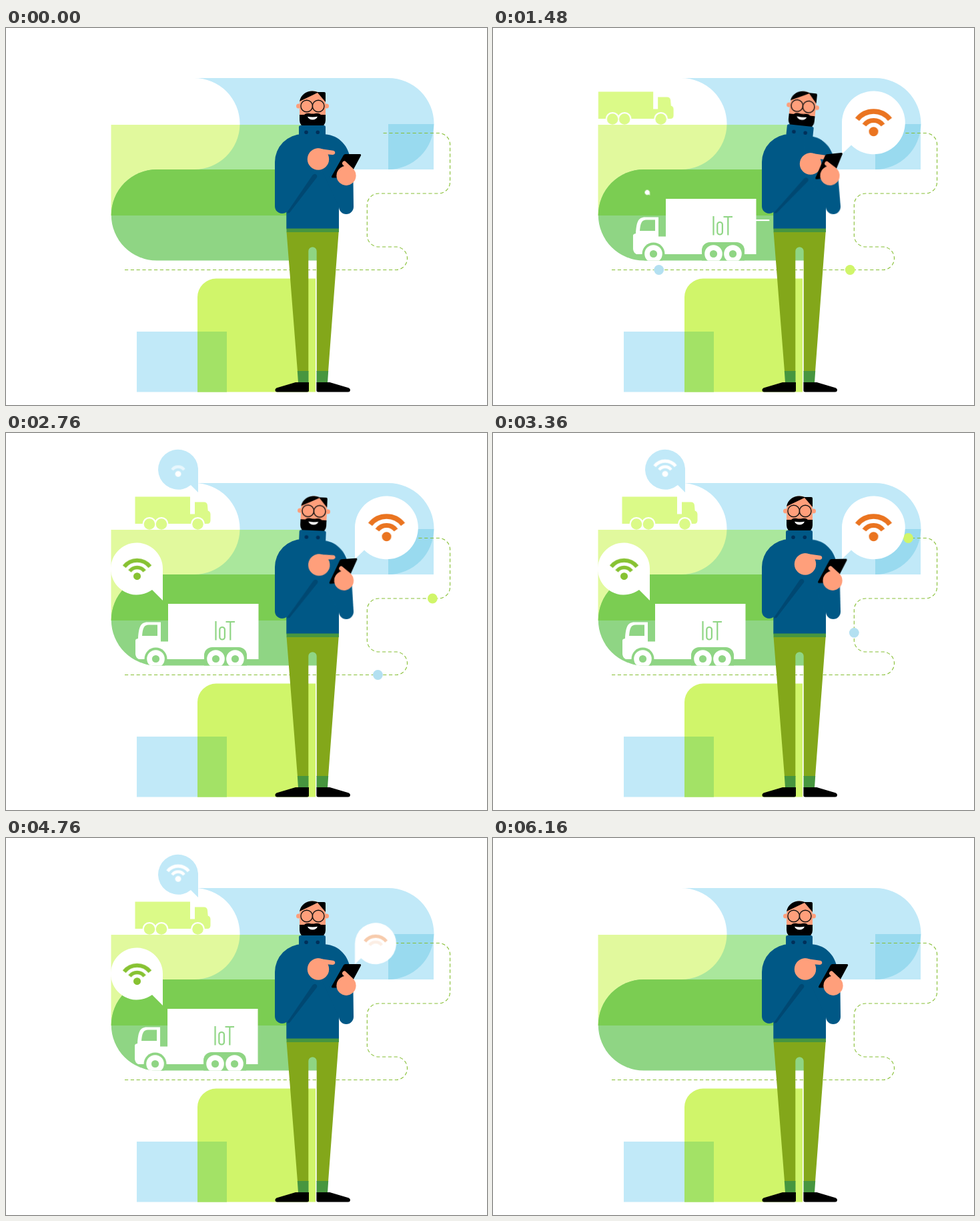
Write an HTML page that moves like this. It is 721 px wide and 565 px high and loops after 7040 ms.

```html
<!DOCTYPE html>
<html lang="en">
<head>
<meta charset="utf-8">
<title>Connected trucks</title>
<style>
  html, body { margin: 0; width: 100%; height: 100%; overflow: hidden; background: #fff; }
  svg { display: block; width: 721px; height: 565px; }

  :root {
    --loop: 7.04s;
    --route: path("M178 362.5H585.5A17.3 17.3 0 0 0 585.5 328H558.5A17.3 17.3 0 0 1 541.3 310.7V265.3A17.3 17.3 0 0 1 558.5 248H648.5A17.3 17.3 0 0 0 665.6 230.7V174.8A17.3 17.3 0 0 0 648.5 157.5H562");
  }

  /* dots on the route */
  .dot {
    offset-path: var(--route);
    offset-rotate: 0deg;
    animation: travel var(--loop) linear var(--in, 0s) infinite backwards;
  }
  @keyframes travel {
    0% { offset-distance: 0%; r: 0px; }
    1.4% { r: 7.4px; }
    51.3% { offset-distance: 100%; r: 7.4px; }
    51.31%, 100% { offset-distance: 100%; r: 0px; }
  }

  /* trucks: cubic ease-out on entry, cubic ease-in on exit */
  .big { animation: big var(--loop) linear infinite; }
  @keyframes big {
    0%, .57% { transform: translateX(534px); animation-timing-function: cubic-bezier(.333, 1, .667, 1); }
    30.24% { transform: translateX(0); }
    64.77% { transform: translateX(0); animation-timing-function: cubic-bezier(.333, 0, .667, 0); }
    83.81%, 100% { transform: translateX(-284px); }
  }
  .trail { transform-origin: 378px 288px; animation: trail var(--loop) linear infinite; }
  @keyframes trail {
    0%, 21% { transform: scaleX(1); }
    27.8%, 100% { transform: scaleX(0); }
  }
  .small { animation: small var(--loop) linear infinite; }
  @keyframes small {
    0%, .57% { transform: translateX(-328.5px); animation-timing-function: cubic-bezier(.333, 1, .667, 1); }
    39.77% { transform: translateX(0); }
    70.45% { transform: translateX(0); animation-timing-function: cubic-bezier(.333, 0, .667, 0); }
    86.65%, 100% { transform: translateX(174px); }
  }

  /* speech bubbles: one animation opens, the other closes */
  .bubble {
    animation:
      open var(--loop) linear var(--in) infinite backwards,
      close var(--loop) linear var(--out) infinite backwards;
  }
  @keyframes open {
    0% { scale: 0; animation-timing-function: cubic-bezier(.3, .4, .3, 1); }
    5.7%, 85% { scale: 1; }
    85.01%, 100% { scale: 0; }
  }
  @keyframes close {
    0% { transform: scale(1); animation-timing-function: cubic-bezier(.333, 0, .667, .333); }
    5.82%, 42.6% { transform: scale(0); }
    42.61%, 100% { transform: scale(1); }
  }
  .wifi { fill: none; stroke-width: 7; }
  .wifi > * {
    animation:
      show var(--loop) linear calc(var(--in) + .3s + var(--i) * .13s) infinite backwards,
      hide var(--loop) linear calc(var(--out) - .12s + var(--i) * .08s) infinite backwards;
  }
  .wifi > :nth-child(1) { --i: 0; }
  .wifi > :nth-child(2) { --i: 1; }
  .wifi > :nth-child(3) { --i: 2; stroke-width: 7.6; }
  @keyframes show {
    0% { opacity: 0; }
    2.7%, 85% { opacity: 1; }
    85.01%, 100% { opacity: 0; }
  }
  @keyframes hide {
    0% { stroke-opacity: 1; }
    4.55%, 42.6% { stroke-opacity: 0; }
    42.61%, 100% { stroke-opacity: 1; }
  }

  /* man */
  .head, .sleeve, .phone, .hand, .crease { animation: var(--loop) ease-in-out infinite; }
  .head { transform-origin: 459px 165px; animation-name: head; }
  @keyframes head {
    0%, .57% { transform: rotate(0deg); }
    9.1%, 30.7% { transform: rotate(6deg); }
    46%, 100% { transform: rotate(0deg); }
  }
  .sleeve { transform-origin: 510px 268px; animation-name: sleeve; }
  @keyframes sleeve {
    0%, .57% { transform: rotate(0deg); }
    9.1% { transform: rotate(-4deg); }
    30.7% { transform: rotate(-4deg); animation-timing-function: cubic-bezier(.35, 0, .35, 1); }
    59.7%, 100% { transform: rotate(0deg); }
  }
  .phone { transform-origin: 510px 221px; animation-name: phone; }
  @keyframes phone {
    0%, .57% { transform: translateX(0) rotate(0deg); }
    9.1% { transform: translateX(-5px) rotate(-6deg); }
    30.7% { transform: translateX(-5px) rotate(-6deg); animation-timing-function: cubic-bezier(.35, 0, .35, 1); }
    59.7%, 100% { transform: translateX(0) rotate(0deg); }
  }
  .hand { transform-origin: 468px 196px; animation-name: hand; }
  @keyframes hand {
    0%, 2.8% { transform: translate(0, 0) rotate(0deg); }
    9.1%, 22.2% { transform: translate(8px, 7px) rotate(0deg); }
    28%, 30.7% { transform: translate(3px, 3px) rotate(-12deg); }
    46%, 100% { transform: translate(0, 0) rotate(0deg); }
  }
  .crease { transform-origin: 422px 278px; animation-name: crease; }
  @keyframes crease {
    0%, 2.8% { transform: rotate(0deg); }
    9.1%, 22.2% { transform: rotate(7deg); }
    28%, 30.7% { transform: rotate(3deg); }
    46%, 100% { transform: rotate(0deg); }
  }
</style>
</head>
<body>
<svg viewBox="0 0 721 565">
  <defs>
    <clipPath id="lane"><path d="M226 212H466V348.5H226A68.25 68.25 0 0 1 226 212Z"/></clipPath>
    <clipPath id="top"><path d="M157.5 75H282A68.5 68.5 0 0 1 350.5 145H157.5Z"/></clipPath>
  </defs>

  <!-- backdrop -->
  <g fill="#c1e9f8">
    <path d="M282 75H573A68.5 68.5 0 0 1 573 212H282A68.5 68.5 0 0 0 282 75Z"/>
    <path d="M573 144H641V212H573Z"/>
    <path d="M196 455H331V545.5H196Z"/>
  </g>
  <path fill="#99daef" d="M573 144H641.3A68.5 68.5 0 0 1 573 212Z"/>
  <path fill="#e1f99d" d="M157.5 145H442V281H157.5Z"/>
  <path fill="#aae79c" d="M350.5 145A68.5 68.5 0 0 1 282 212H442V145Z"/>
  <path fill="#8fd584" d="M226 212H466V348.5H226A68.25 68.25 0 0 1 226 212Z"/>
  <path fill="#7bcd52" d="M226 212H442V281H157.8A68.25 68.25 0 0 1 226 212Z"/>
  <path fill="#d0f56a" d="M287 545.5V403.5A28 28 0 0 1 315 375.5H464V545.5Z"/>
  <path fill="#a3e266" d="M287 455H331V545.5H287Z"/>

  <!-- small truck -->
  <g clip-path="url(#top)">
    <g class="small" fill="#dbfa88">
      <path d="M193.5 95.5H276V121.5H283V103.5H296.5Q301.5 103.5 302 108.5L302.7 116.5Q306.5 117.5 306.5 122V131.5Q306 136 302 136H193.5Z"/>
      <g fill="#fff">
        <circle cx="215" cy="136.5" r="10.5"/>
        <circle cx="233" cy="136.5" r="10.5"/>
        <circle cx="287.5" cy="136.5" r="10.5"/>
      </g>
      <circle cx="215" cy="136.5" r="8.3"/>
      <circle cx="233" cy="136.5" r="8.3"/>
      <circle cx="287.5" cy="136.5" r="8.3"/>
    </g>
  </g>

  <!-- big truck -->
  <g clip-path="url(#lane)">
    <g class="big" fill="#fff">
      <path d="M243 256H378.5V339H199Q194 336 194 331V311Q194 308.5 198 308C199 292 201 283.5 212 283.5H232V312.5H243Z"/>
      <path class="trail" d="M378 287H398.5V289.2H378Z"/>
      <g fill="#8fd584">
        <path d="M204 304C205 292 207 287.5 214 287.5H227V304Z"/>
        <circle cx="224.5" cy="338.5" r="17"/>
        <rect x="297" y="321" width="64" height="40" rx="12"/>
      </g>
      <circle cx="224.5" cy="338.5" r="13.3"/>
      <circle cx="314.5" cy="338.5" r="13.3"/>
      <circle cx="343.5" cy="338.5" r="13.3"/>
      <g fill="#8fd584">
        <circle cx="224.5" cy="338.5" r="5.6"/>
        <circle cx="314.5" cy="338.5" r="5.6"/>
        <circle cx="343.5" cy="338.5" r="5.6"/>
      </g>
      <g role="img" aria-label="IoT" fill="none" stroke="#8fd584" stroke-width="2.2">
        <path d="M314.5 282V310.5M329.5 283H343M336.3 283V310.5"/>
        <rect x="320.3" y="291" width="7.6" height="18.5" rx="3.8"/>
      </g>
    </g>
  </g>

  <!-- route -->
  <path fill="none" stroke="#86bf34" stroke-width="1.1" stroke-dasharray="5.2 3.6" d="M178 362.5H585.5A17.3 17.3 0 0 0 585.5 328H558.5A17.3 17.3 0 0 1 541.3 310.7V265.3A17.3 17.3 0 0 1 558.5 248H648.5A17.3 17.3 0 0 0 665.6 230.7V174.8A17.3 17.3 0 0 0 648.5 157.5H562"/>
  <circle class="dot" r="0" fill="#d0f56a"/>
  <circle class="dot" r="0" fill="#b3e0f1" style="--in: 1.188s"/>

  <!-- bubbles -->
  <g class="bubble" style="--in: .69s; --out: 4.52s; transform-origin: 523px 189px">
    <path fill="#fff" d="M523 189V142A47.4 47.4 0 1 1 537 175.5Z"/>
    <g class="wifi" stroke="#ea7420" transform="translate(570.5 156)">
      <circle cy="-.8" r="3.5"/>
      <path d="M-14-10.5A17.5 17.5 0 0 1 14-10.5"/>
      <path d="M-24.5-19A31 31 0 0 1 24.5-19"/>
    </g>
  </g>
  <g class="bubble" style="--in: 1.455s; --out: 5.05s; transform-origin: 235px 251px">
    <path fill="#fff" d="M235 251V204A39 39 0 1 0 219 235Z"/>
    <g class="wifi" stroke="#87c232" transform="translate(196.5 215.3) scale(.79)">
      <circle cy="-.8" r="3.5"/>
      <path d="M-14-10.5A17.5 17.5 0 0 1 14-10.5"/>
      <path d="M-24.5-19A31 31 0 0 1 24.5-19"/>
    </g>
  </g>
  <g class="bubble" style="--in: 2.21s; --out: 5.58s; transform-origin: 288px 89px">
    <path fill="#c1e9f8" d="M288 89V53A30 30 0 1 0 277 78Z"/>
    <g class="wifi" stroke="#fff" transform="translate(258 61.8) scale(.64)">
      <circle cy="-.8" r="3.5"/>
      <path d="M-14-10.5A17.5 17.5 0 0 1 14-10.5"/>
      <path d="M-24.5-19A31 31 0 0 1 24.5-19"/>
    </g>
  </g>

  <!-- man -->
  <path fill="#83a71a" d="M420.5 305H498.7L483 515H465.7V334.5A6.2 6.2 0 0 0 453.3 334.5V515H437Z"/>
  <path fill="#47963f" d="M436.8 514H453.5V531.5H438ZM465.5 514H483.2L482 531.5H465.5ZM420.3 300H499V306H420.7Z"/>
  <path id="shoe" d="M434 531H454V543Q454 545.5 451.5 545.5H406.5Q403.5 545.5 403.5 542.5Q403.5 540 407 539Z"/>
  <use href="#shoe" transform="translate(919.4 0) scale(-1 1)"/>

  <g fill="#005886">
    <path d="M403 267V201A42 42 0 0 1 445 159H474L499 185V300.5H420.3V276A11 11 0 0 1 403 267Z"/>
    <path class="sleeve" d="M474 159C497 159 512 174 516 195L520.5 228 521 268A11 11 0 0 1 499 268L474 215Z"/>
  </g>
  <path class="crease" fill="#004872" d="M420.5 277.5L459.5 220.5Q462 217.5 465 219.5Q467.5 221.5 465.5 224.5L425 277Z"/>

  <g class="head">
    <g fill="#ff9f7b">
      <circle cx="438.5" cy="117" r="3.5"/>
      <circle cx="480.5" cy="117" r="3.5"/>
      <path d="M440 140V114A19.5 19.5 0 0 1 479 114V140Z"/>
    </g>
    <path d="M440 110C442 100 450 94.5 459 94.5Q464 94.5 467 96H477Q479 96 479 98V111L467 97Z"/>
    <path d="M440 130H447Q450 127 455 128Q459.5 129 464 128Q469 127 472 130H479V138Q479 148 469 148H450Q440 148 440 138Z"/>
    <path fill="#fff" d="M452 132.8Q459.5 134 467 132.8Q465 137.5 459.5 137.5Q454 137.5 452 132.8Z"/>
    <g fill="none" stroke="#111" stroke-width="1.4">
      <circle cx="450.7" cy="117" r="8.8"/>
      <circle cx="468.2" cy="117" r="8.8"/>
    </g>
    <rect x="439" y="146" width="40" height="17" rx="2.5" fill="#005886"/>
    <g fill="#00305a">
      <circle cx="450" cy="156.3" r="2.8"/>
      <circle cx="467.3" cy="156.3" r="2.8"/>
    </g>
  </g>

  <g class="hand" fill="#ff9f7b">
    <circle cx="468" cy="196.5" r="16.2"/>
    <path d="M466 180.3L490.5 183.7Q493.5 184.5 493.2 187.3Q492.7 190 489.5 190L478 189Z"/>
  </g>
  <g class="phone">
    <path d="M508.5 189H530.5Q533 189.3 531.7 191.7L514 224.5H489.5Q487 224 488.5 221.5L506 190.5Q507 189 508.5 189Z"/>
    <circle cx="510" cy="221.3" r="14.6" fill="#ff9f7b"/>
    <path fill="none" stroke="#ff9f7b" stroke-width="6.5" stroke-linecap="round" d="M507.3 202.8L517 212"/>
  </g>
</svg>
</body>
</html>
```
